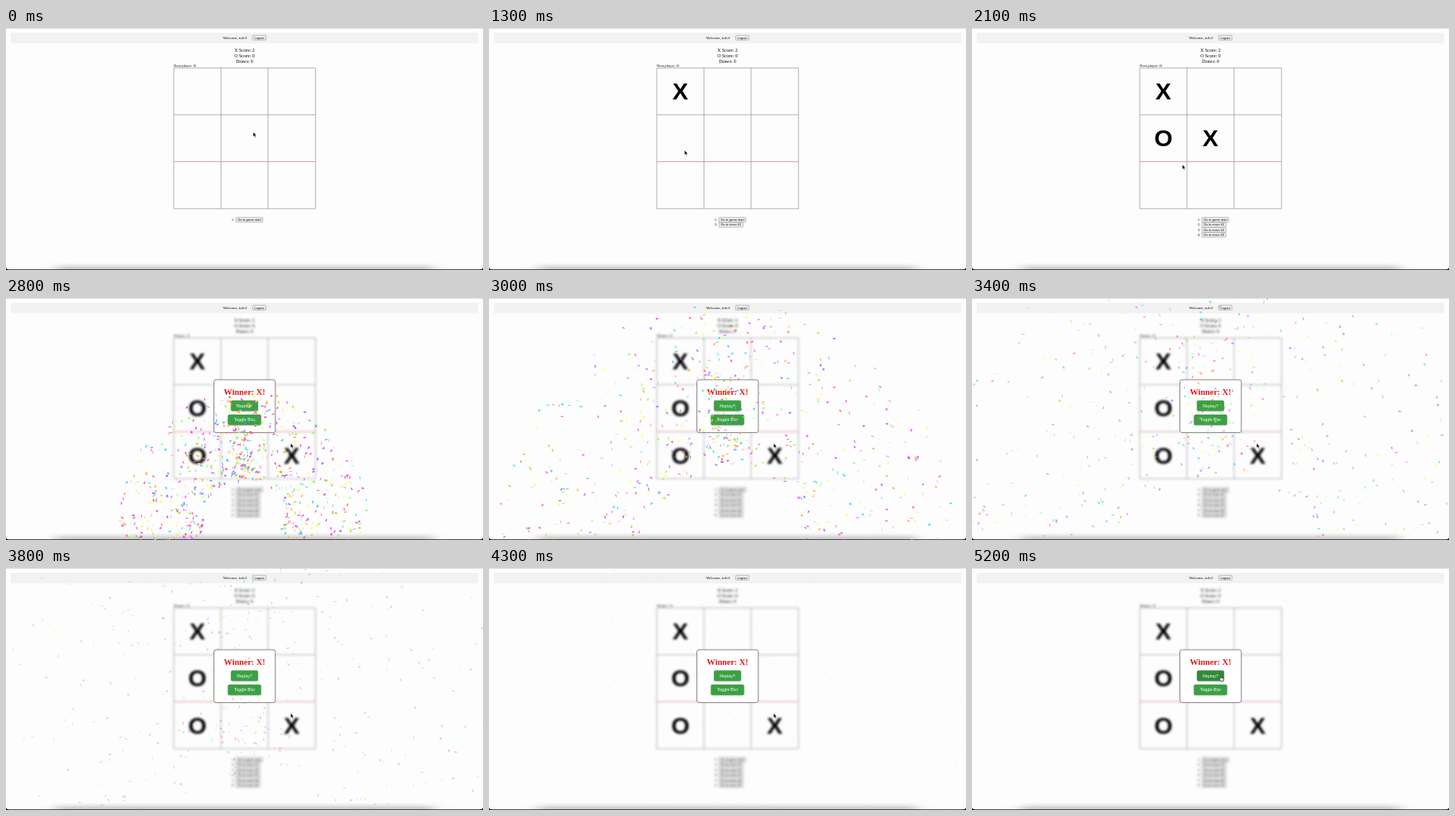
Animation of 600x305 px, one loop 5400 ms. Source, as an HTML page with a canvas:

```html
<!DOCTYPE html>
<html lang="en">
<head>
<meta charset="utf-8">
<title>Tic-tac-toe</title>
<style>
  html, body { margin: 0; width: 100%; height: 100%; overflow: hidden; background: #fdfdfd; }
  svg, canvas { position: absolute; left: 0; top: 0; width: 100%; height: 100%; display: block; }
  text { font-family: "Liberation Serif", "Times New Roman", serif; font-size: 4.74px; }
  .sans { font-family: "Liberation Sans", Arial, sans-serif; }
  .mid { text-anchor: middle; }
  .small { font-size: 3.95px; }
  .score { font-size: 5.95px; }
  .mark { font-size: 29.65px; font-weight: bold; }
  .title { font-size: 10.6px; font-weight: bold; fill: #dc1414; }
  .action { font-size: 5.34px; fill: #fff; }
  .plain { fill: #efefef; stroke: #777; stroke-width: .45; }
  .green { fill: #3aa142; filter: drop-shadow(0 .9px .8px #0005); }
  .green.hover { fill: #318a39; }
  .blurred { filter: blur(1.45px); }
</style>
</head>
<body>
<svg id="stage" viewBox="0 0 600 305" preserveAspectRatio="none">
  <defs>
    <linearGradient id="shade" x1="0" y1="0" x2="0" y2="1">
      <stop offset="0" stop-color="#888" stop-opacity="0"/>
      <stop offset="1" stop-color="#777" stop-opacity=".5"/>
    </linearGradient>
    <filter id="soft" x="-10%" y="-50%" width="120%" height="200%">
      <feGaussianBlur stdDeviation="9 1"/>
    </filter>
  </defs>
  <rect width="600" height="305" fill="#fdfdfd"/>
  <rect width="600" height="1" fill="#dcdcdc"/>
  <rect x="6" y="6" width="588" height="13.3" fill="#f2f2f2"/>
  <g id="header"></g>
  <g id="page">
    <g id="scores"></g>
    <text id="status" x="211" y="49"></text>
    <path d="M211 50.3H389.3V227.8H211ZM270.4 50V228M329.7 50V228M211 109.3H389"
          fill="none" stroke="#a0a0a0" stroke-width=".8"/>
    <path d="M211 168.4H389" stroke="#d98f8f" stroke-width=".9"/>
    <g id="marks"></g>
    <g id="history"></g>
  </g>
  <rect x="62" y="296" width="476" height="9" fill="url(#shade)" filter="url(#soft)"/>
  <path d="M0 301Q0 304.2 4 304.2H596Q600 304.2 600 301V305H0Z" fill="#111"/>
  <g id="dialog">
    <rect x="261.5" y="103" width="77.3" height="66.6" rx="2.6" fill="#fff" stroke="#777" stroke-width=".9"/>
    <text class="mid title" x="300" y="122">Winner: X!</text>
    <rect id="replay" class="green" x="283" y="129.2" width="34" height="13.3" rx="1.8"/>
    <text class="sans mid action" x="300" y="137.7">Replay?</text>
    <rect class="green" x="279.2" y="147" width="41.6" height="13.2" rx="1.8"/>
    <text class="sans mid action" x="300" y="155.4">Toggle Blur</text>
  </g>
  <g id="cursor">
    <path id="arrow" d="M0 0V6L1.4 4.8L2.4 7L3.4 6.5L2.4 4.4H4.2Z" fill="#000" stroke="#fff" stroke-width=".5"/>
    <path id="hand" d="M1.3 3.6V.6Q2 -.3 2.6 .6V2.4L5 2.9Q5.9 3.2 5.7 4.2L5 6.6H2L.1 4.2Q.2 3.2 1.3 3.6Z"
          fill="#fff" stroke="#111" stroke-width=".6"/>
  </g>
</svg>
<canvas id="confetti" width="600" height="305"></canvas>
<script>
const LOOP = 5400, STEP = 100;
const MOVES = [[1000, 0], [1500, 3], [1900, 4], [2300, 6], [2700, 8]];
const WIN = 2700, HOVER = 5000;

// time, x, y: the pointer holds each place until the next entry
const POINTER = [
  [0, 311, 131], [100, 317, 147], [200, 321, 161], [300, 303, 133], [400, 271, 92],
  [500, 254.5, 72.5], [700, 254, 72], [1100, 252, 94], [1200, 248, 136], [1300, 246, 154],
  [1700, 264, 147], [1800, 290, 140], [1900, 297, 138], [2100, 264.5, 172],
  [2200, 248, 193], [2300, 244, 197], [2400, 280, 196], [2500, 330, 189], [2600, 355, 184],
  [2700, 358, 183], [4600, 353, 180], [4700, 344, 169], [4800, 332, 153],
  [4900, 321, 141], [5000, 315, 136], [5100, 316, 152], [5200, 311, 136]
];

const $ = id => document.getElementById(id);
const label = (x, y, cls, str) => `<text x="${x}" y="${y}" class="${cls}">${str}</text>`;
const button = (x, y, w, str) =>
  `<rect class="plain" x="${x}" y="${y}" width="${w}" height="6" rx=".9"/>` +
  label(x + w / 2, y + 4.4, "sans mid small", str);

$("header").innerHTML = label(273, 13.8, "", "Welcome, tulvi!") + button(310.2, 9.2, 16.8, "Logout");
$("scores").innerHTML = ["X Score: 2", "O Score: 0", "Draws: 0"]
  .map((str, i) => label(300, 30 + i * 6.8, "mid score", str)).join("");
$("marks").innerHTML = MOVES.map(([, cell], i) =>
  label(240.7 + cell % 3 * 59.3, 90.2 + Math.floor(cell / 3) * 59.2, "sans mid mark", "XO"[i % 2])).join("");
$("history").innerHTML = Array.from({ length: MOVES.length + 1 }, (_, i) => {
  const y = 238.7 + i * 6.35;
  const go = i ? button(289.2, y, 30.3, `Go to move #${i}`) : button(289.2, y, 33.8, "Go to game start");
  return `<g>${label(283.7, y + 4.4, "", `${i + 1}.`)}${go}</g>`;
}).join("");

let seed = 29;
const rand = () => (seed = (seed * 16807) % 2147483647) / 2147483647;
const COLORS = ["#26ccff", "#a25afd", "#ff5e7e", "#88ff5a", "#fcff42", "#ffa62d", "#ff36ff"];
const pieces = Array.from({ length: 820 }, (_, i) => {
  const u = rand();
  return {
    angle: Math.PI * (-0.11 + 1.22 * (u - 0.035 * Math.sin(4 * Math.PI * u) + 0.035 * Math.sin(2 * Math.PI * u))),
    reach: 150 + 310 * rand(),
    fall: 65 + 70 * rand(),
    wobble: rand() * 10,
    wobbleSpeed: 6 + 6 * rand(),
    tilt: (0.25 + 0.5 * rand()) * Math.PI,
    size: 2 + rand(),
    color: COLORS[i % COLORS.length]
  };
});

const ctx = $("confetti").getContext("2d");

function drawConfetti(time) {
  ctx.clearRect(0, 0, 600, 305);
  const age = (time - WIN + 50) / 1000, fade = 1 - (time - WIN) / 1700;
  if (time < WIN || fade <= 0) return;
  const spread = 1 - Math.exp(-2.8 * age), scale = 0.34;
  ctx.globalAlpha = fade;
  for (const p of pieces) {
    const x = 300 + Math.cos(p.angle) * p.reach * spread;
    const y = 262 - Math.sin(p.angle) * p.reach * spread + p.fall * age;
    const wobble = p.wobble + p.wobbleSpeed * age, tilt = p.tilt + 6 * age;
    const wx = 10 * scale * Math.cos(wobble), wy = 10 * scale * Math.sin(wobble);
    const tx = p.size * scale * 1.3 * Math.cos(tilt), ty = p.size * scale * 1.3 * Math.sin(tilt);
    ctx.fillStyle = p.color;
    ctx.beginPath();
    ctx.moveTo(x, y);
    ctx.lineTo(x + wx, y + ty);
    ctx.lineTo(x + wx + tx, y + wy + ty);
    ctx.lineTo(x + tx, y + wy);
    ctx.fill();
  }
}

const show = (el, on) => { el.style.display = on ? "" : "none"; };

function render(time) {
  const played = MOVES.filter(([at]) => time >= at).length;
  const won = time >= WIN, hover = time >= HOVER;
  [...$("marks").children].forEach((el, i) => show(el, i < played));
  [...$("history").children].forEach((el, i) => show(el, i <= played));
  $("status").textContent = won ? "Winner: X" : `Next player: ${"XO"[played % 2]}`;
  $("page").classList.toggle("blurred", won);
  $("replay").classList.toggle("hover", hover);
  show($("dialog"), won);
  show($("arrow"), !hover);
  show($("hand"), hover);
  const [, x, y] = POINTER.findLast(([at]) => time >= at);
  $("cursor").setAttribute("transform", `translate(${x} ${y})`);
  drawConfetti(time);
}

const start = performance.now();
let last = -1;
function tick() {
  const time = Math.floor((performance.now() - start) % LOOP / STEP) * STEP;
  if (time !== last) render(last = time);
  requestAnimationFrame(tick);
}
tick();
</script>
</body>
</html>
```
